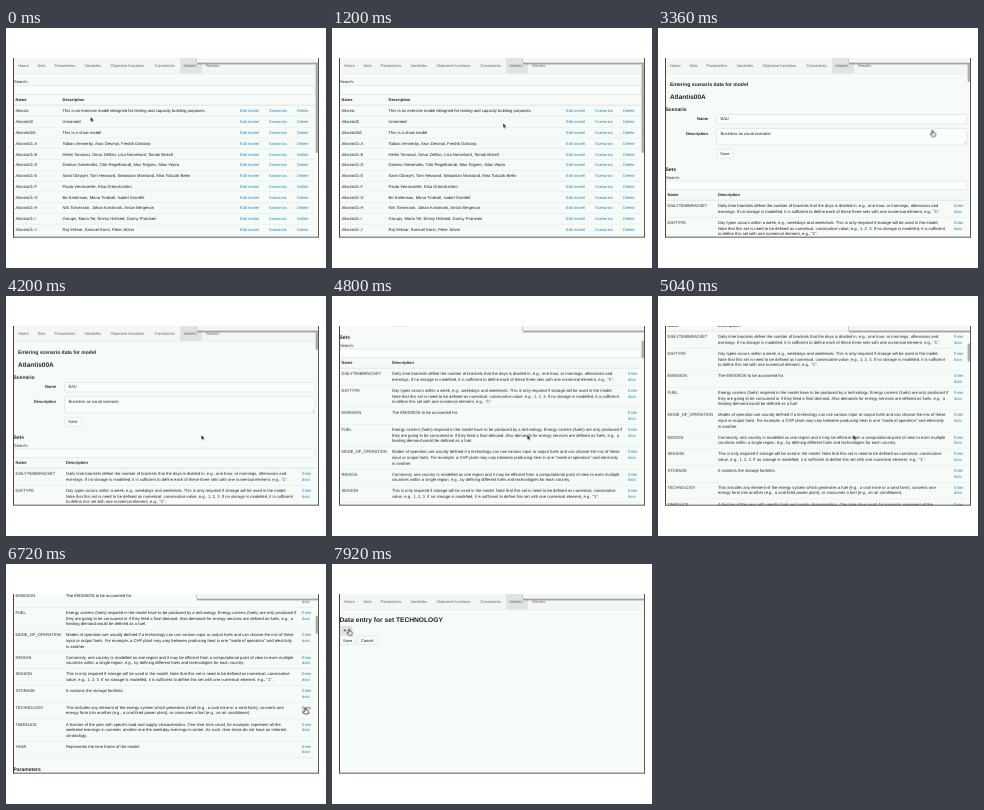
An HTML page that plays this animation: 320 by 240 pixels, repeating every 8 s.

```html
<!DOCTYPE html>
<html lang="en">
<head>
<meta charset="utf-8">
<title>Model data entry</title>
<style>
  html, body { margin: 0; width: 100%; height: 100%; overflow: hidden; background: #fff; }
  svg { display: block; width: 100%; height: 100%; }
  text { font-family: "Liberation Sans", Arial, sans-serif; fill: #222; white-space: pre; text-rendering: geometricPrecision; }
  .bold { font-weight: 700; }
  .nav { fill: #666; }
  .link { fill: #2586bd; }
  .hover { fill: #175f8c; text-decoration: underline; }
  .pressed { fill: #b0403c; text-decoration: underline; }
</style>
</head>
<body>
<svg id="stage" viewBox="0 0 320 240" preserveAspectRatio="none"></svg>
<script>
const LOOP = 8000;
const PAPER = '#f6fbf8';
const RULE = '#e3eae7';
const LINE = 5.6;
const BODY = 4.15;
const SCENARIO_AT = 3360;
const ENTRY_AT = 6780;
const stage = document.getElementById('stage');

const models = [
  ['Atlantis', 'This is an exercise model designed for testing and capacity building purposes.'],
  ['Atlantis00', 'Unnamed'],
  ['Atlantis00A', 'This is a show model'],
  ['Atlantis01-A', 'Tobias Vennerby, Arun Desmal, Fredrik Dalstorp'],
  ['Atlantis01-B', 'Helmi Tarvosal, Omar Zelifan, Lisa Norvelund, Tomak Brisell'],
  ['Atlantis01-D', 'Damian Solvendes, Otto Regelbrandt, Max Tolgren, Silas Vepra'],
  ['Atlantis01-E', 'Sami Obrayel, Tom Hesward, Sebastian Morvland, Mira Tolczak-Behn'],
  ['Atlantis01-F', 'Paula Venskarelle, Elsa Grönvikström'],
  ['Atlantis01-G', 'Bo Karlenson, Mona Tindvall, Isabel Granfelt'],
  ['Atlantis01-H', 'Nils Torvesson, Johan Kvistmark, Anton Bergeson'],
  ['Atlantis01-I', 'Groups, Maria Tel, Emmy Holtsed, Danny Pransten'],
  ['Atlantis01-J', 'Raj Velmar, Samuel Korst, Peter Jolver']
];

const sets = [
  ['DAILYTIMEBRACKET',
    'Daily time brackets define the number of brackets that the days is divided in, e.g., one hour, or mornings, afternoons and',
    'evenings. If no storage is modelled, it is sufficient to define each of these three sets with one numerical element, e.g., "1".'],
  ['DAYTYPE',
    'Day types occurs within a week, e.g., weekdays and weekends. This is only required if storage will be used in the model.',
    'Note that this set is need to be defined as numerical, consecutive value, e.g., 1, 2, 3. If no storage is modelled, it is sufficient',
    'to define this set with one numerical element, e.g., "1".'],
  ['EMISSION', 'The EMISSION to be accounted for.'],
  ['FUEL',
    'Energy carriers (fuels) required in the model have to be produced by a technology. Energy carriers (fuels) are only produced if',
    'they are going to be consumed or if they feed a final demand. Also demands for energy services are defined as fuels, e.g., a',
    'heating demand would be defined as a fuel.'],
  ['MODE_OF_OPERATION',
    'Modes of operation are usually defined if a technology can use various input or output fuels and can choose the mix of these',
    'input or output fuels. For example, a CHP plant may vary between producing heat in one "mode of operation" and electricity',
    'in another.'],
  ['REGION',
    'Commonly, one country is modelled as one region and it may be efficient from a computational point of view to even multiple',
    'countries within a single region, e.g., by defining different fuels and technologies for each country.'],
  ['SEASON',
    'This is only required if storage will be used in the model. Note that this set is need to be defined as numerical, consecutive',
    'value, e.g., 1, 2, 3. If no storage is modelled, it is sufficient to define this set with one numerical element, e.g., "1".'],
  ['STORAGE', 'It contains the storage facilities.'],
  ['TECHNOLOGY',
    'This includes any element of the energy system which generates a fuel (e.g., a coal mine or a wind farm), converts one',
    'energy form into another (e.g., a coal-fired power plant), or consumes a fuel (e.g., an air conditioner).'],
  ['TIMESLICE',
    'A fraction of the year with specific load and supply characteristics. One time slice could, for example, represent all the',
    'weekend evenings in summer, another one the weekday evenings in winter. As such, time slices do not have an inherent',
    'chronology.'],
  ['YEAR', 'Represents the time frame of the model.']
];

function add(parent, tag, attrs = {}) {
  const el = document.createElementNS('http://www.w3.org/2000/svg', tag);
  for (const [key, value] of Object.entries(attrs)) el.setAttribute(key, value);
  parent.append(el);
  return el;
}

const group = (parent, attrs) => add(parent, 'g', attrs);

const box = (parent, x, y, width, height, fill, more = {}) =>
  add(parent, 'rect', { x, y, width, height, fill, ...more });

const field = (parent, x, y, width, height, fill = '#f9fdfb') =>
  box(parent, x, y, width, height, fill, { rx: 1, stroke: '#d9e0dd', 'stroke-width': .6 });

// y is the vertical middle of the capitals.
function label(parent, x, y, content, kind = '', size = 4, anchor = 'start') {
  const el = add(parent, 'text', {
    x, y: y + size * .36, class: kind, 'font-size': size, 'text-anchor': anchor
  });
  el.textContent = content;
  return el;
}

function play(el, steps) {
  const frames = steps.map(([ms, props, easing = 'linear']) => ({ offset: ms / LOOP, easing, ...props }));
  frames.push({ ...frames[frames.length - 1], offset: 1 });
  el.animate(frames, { duration: LOOP, iterations: Infinity });
}

// Visible only within the given spans; offsets stay distinct at both loop ends.
function show(el, ...spans) {
  const steps = spans[0][0] > 0 ? [[0, { opacity: 0 }, 'step-end']] : [];
  for (const [from, to] of spans) {
    steps.push([from, { opacity: 1 }, 'step-end']);
    if (to < LOOP) steps.push([to, { opacity: 0 }, 'step-end']);
  }
  play(el, steps);
}

const at = (x, y) => ({ transform: `translate(${x}px, ${y}px)` });

function navbar(page) {
  box(page, 7, 30, 306, 15.5, '#f2f6f4');
  box(page, 174, 30, 22, 15.5, '#dfe4e1');
  box(page, 7, 45.2, 306, .5, RULE);
  const items = [
    [12, 'Home'], [31.5, 'Sets'], [48.5, 'Parameters'], [78.5, 'Variables'],
    [104.5, 'Objective functions'], [148.5, 'Constraints'], [177.5, 'Models'], [200, 'Results']
  ];
  for (const [x, name] of items) label(page, x, 38, name, 'nav');
}

function tableHead(page, y, descriptionX) {
  label(page, 9.5, y, 'Name', 'bold');
  label(page, descriptionX, y, 'Description', 'bold');
  box(page, 8, y + 4.8, 301, .7, '#d5dcd9');
}

function modelPage(page) {
  navbar(page);
  label(page, 8, 54, 'Search:');
  field(page, 8, 57.5, 301, 9);
  tableHead(page, 72, 56.5);
  models.forEach(([name, description], i) => {
    const y = 83 + i * 10.77;
    label(page, 9.5, y, name);
    label(page, 56.5, y, description, '', BODY);
    label(page, 234, y, 'Edit model', 'link');
    const scenarios = label(page, 263, y, 'Scenarios', 'link');
    label(page, 291, y, 'Delete', 'link');
    box(page, 8, y + 5.2, 301, .5, RULE);
    if (name === 'Atlantis00A') {
      show(scenarios, [0, 2100]);
      show(label(page, 263, y, 'Scenarios', 'link hover'), [2100, SCENARIO_AT]);
    }
  });
  box(page, 309.6, 36, 2.4, 89, '#a9aeac', { rx: 1.2 });
}

function scenarioPage(page) {
  navbar(page);
  label(page, 12, 56, 'Entering scenario data for model', 'bold', 5);
  label(page, 12, 69, 'Atlantis00A', 'bold', 6.5);
  label(page, 7.5, 81, 'Scenario', 'bold', 5);
  label(page, 50, 91, 'Name', 'bold', 4, 'end');
  field(page, 58.5, 86.5, 250.5, 9.5);
  label(page, 62.5, 91, 'BAU');
  label(page, 50, 105.5, 'Description', 'bold', 4, 'end');
  field(page, 58.5, 100.5, 250.5, 16.5);
  label(page, 62.5, 105.5, 'Business as usual scenario', '', BODY);
  add(page, 'path', { d: 'M306 116l2-2M307.3 116l.7-.7', stroke: '#999', 'stroke-width': .4 });
  field(page, 59, 121.3, 16.5, 9);
  label(page, 62.3, 126, 'Save');
  label(page, 7.5, 141, 'Sets', 'bold', 5);
  label(page, 8, 149.5, 'Search:');
  field(page, 8, 152.8, 301, 9);
  tableHead(page, 167, 60);

  let y = 178;
  for (const [name, ...lines] of sets) {
    label(page, 9.5, y, name);
    lines.forEach((line, i) => label(page, 60, y + i * LINE, line, '', BODY));
    const enter = label(page, 296, y, 'Enter', 'link');
    label(page, 296, y + LINE, 'data', 'link');
    if (name === 'TECHNOLOGY') {
      show(enter, [0, 6500]);
      show(label(page, 296, y, 'Enter', 'link pressed'), [6500, ENTRY_AT]);
    }
    y += Math.max(2, lines.length) * LINE + 5.5;
    box(page, 8, y - 5.4, 301, .5, RULE);
  }
  label(page, 7.5, 390, 'Parameters', 'bold', 5);
}

function entryPage(page) {
  navbar(page);
  label(page, 7.5, 55.3, 'Data entry for set TECHNOLOGY', 'bold', 6.65);
  field(page, 8, 62, 12, 9, '#dfe4e1');
  label(page, 11.5, 66.5, '+', 'bold', 5);
  field(page, 8, 72, 16, 8.6, PAPER);
  label(page, 11, 76.3, 'Save');
  field(page, 26, 72, 20, 8.6, PAPER);
  label(page, 29, 76.3, 'Cancel');
}

const defs = add(stage, 'defs');
box(add(defs, 'clipPath', { id: 'window' }), 7, 30, 306, 180, '#000');
const shade = add(defs, 'linearGradient', { id: 'shade', x2: 0, y2: 1 });
add(shade, 'stop', { 'stop-color': '#7f8482' });
add(shade, 'stop', { offset: 1, 'stop-color': '#7f8482', 'stop-opacity': 0 });
box(stage, 0, 0, 320, 240, '#fff');

const view = group(stage, { 'clip-path': 'url(#window)' });
box(view, 7, 30, 306, 180, PAPER);

const modelView = group(view);
modelPage(modelView);
show(modelView, [0, SCENARIO_AT]);

const scenarioView = group(view);
const scroller = group(scenarioView);
scenarioPage(scroller);
const thumb = box(scenarioView, 309.6, 36, 2.4, 18, '#a9aeac', { rx: 1.2 });
show(scenarioView, [SCENARIO_AT, ENTRY_AT]);

const scrollSteps = [[0, 0], [4200, 0], [4800, 100], [5280, 174], [5520, 185]];
play(scroller, scrollSteps.map(([ms, top]) => [ms, at(0, -top)]));
play(thumb, scrollSteps.map(([ms, top]) => [ms, at(0, top * .085)]));

const entryView = group(view);
entryPage(entryView);
show(entryView, [ENTRY_AT, LOOP]);

// Edge of the panel that overlaps the window's top, with its shadow.
box(view, 190, 30, 123, 5, '#c9cecb');
box(view, 191, 30, 122, 4.8, '#f3f5f4');
box(view, 191, 34.8, 122, 2.4, 'url(#shade)');

box(view, 7, 30, 1, 180, '#444');
box(view, 312, 30, 1, 180, '#555');
box(view, 7, 208.6, 306, 1.2, '#777');

const cursor = group(view);
const arrow = add(cursor, 'path', {
  d: 'M0 0V4.6L1.1 3.7L1.9 5.5L2.7 5.1L1.9 3.4H3.3Z',
  fill: '#111', stroke: '#fff', 'stroke-width': .3
});
const hand = add(cursor, 'path', {
  d: 'M-.6 0Q0-.6.6 0V2L2.6 2.5Q3.3 2.7 3.2 3.6L2.6 6H-.6L-2.2 3.6Q-2 2.8-1.2 3.2L-.6 3.8Z',
  fill: '#fff', stroke: '#222', 'stroke-width': .7
});
const glide = 'ease-in-out';
play(cursor, [
  [0, at(84.5, 89)],
  [300, at(84.5, 89), glide],
  [2200, at(274.5, 102.5)],
  [SCENARIO_AT, at(274.5, 102.5), glide],
  [4080, at(195.3, 139)],
  [5580, at(195.3, 139), glide],
  [6550, at(299.3, 144)],
  [7120, at(299.3, 144), glide],
  [7900, at(17.2, 65.3)]
]);
show(arrow, [0, 2100], [3420, 6500], [7140, 7840]);
show(hand, [2100, 3420], [6500, 7140], [7840, LOOP]);
</script>
</body>
</html>
```
